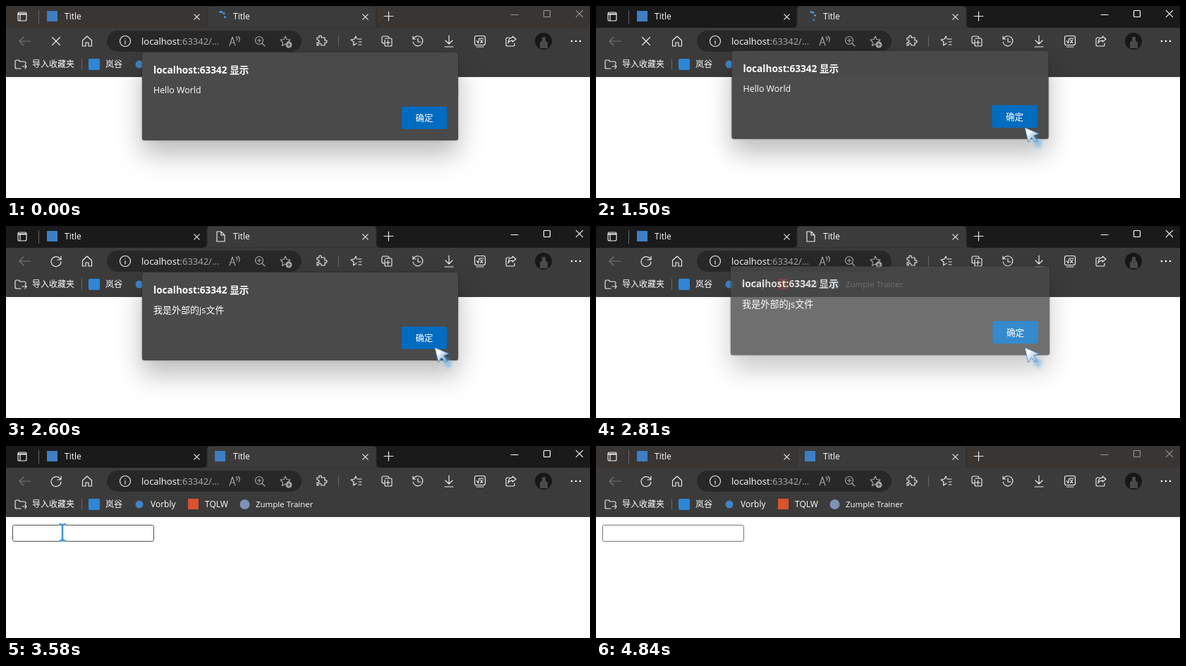
An HTML page that plays this animation: 828x273 px, repeating every 4910 ms.

```html
<!DOCTYPE html>
<html lang="zh">
<head>
<meta charset="utf-8">
<title>Alert dialogs</title>
<style>
  html, body { margin: 0; height: 100%; overflow: hidden; background: #fff; }
  svg { display: block; }
  text { font: 12px 'Open Sans', 'Noto Sans CJK SC', 'Noto Sans CJK', sans-serif; fill: #fff; white-space: pre; }
  .icon { fill: none; stroke-width: 1.15; stroke-linecap: round; stroke-linejoin: round; }
  .panel { fill: #4a4a4a; filter: drop-shadow(0 0 1px #0007) drop-shadow(0 20px 18px #0004); }
  #heading { font-size: 13.6px; font-weight: 700; }
  #ok { font-size: 12.5px; font-weight: 500; text-anchor: middle; }
</style>
</head>
<body>
<svg width="828" height="273" viewBox="0 0 828 273">
  <defs>
    <linearGradient id="ice" x1="0" y1="0" x2="1" y2="1">
      <stop offset=".3" stop-color="#fff"/><stop offset="1" stop-color="#6db0e6" stop-opacity=".7"/>
    </linearGradient>
    <filter id="soft" x="-50%" y="-50%" width="200%" height="200%"><feGaussianBlur stdDeviation="2"/></filter>
  </defs>

  <rect width="828" height="273" fill="#fff"/>
  <rect id="titleBar" width="828" height="31"/>
  <path d="M279 31q6 0 6-6V5q0-5 5-5h230q5 0 5 5v20q0 6 6 6z" fill="#3b3b3b" stroke="#2a2a2a"/>
  <rect y="31" width="828" height="70" fill="#3b3b3b"/>
  <rect x="143" y="35" width="276" height="30" rx="15" fill="#282828"/>
  <path d="M46.5 6v19M471.5 42v16M107.5 75v16" stroke="#666"/>

  <rect x="58" y="7" width="15" height="15" fill="#3d7ec4"/>
  <text x="83" y="19.4">Title</text>
  <text x="322" y="19.4">Title</text>
  <text x="192" y="55" style="font-size:13px">localhost<tspan fill="#aaa">:63342/…</tspan></text>

  <circle cx="762" cy="50" r="12" fill="#171717"/>
  <path d="M757 60v-8l3-3v-5h5v5l3 3v8z" fill="#4c4a48"/>

  <text x="37" y="87">导入收藏夹</text>
  <rect x="117" y="75" width="16" height="16" rx="2" fill="#2f86d6"/>
  <text x="141" y="87">岚谷</text>
  <circle cx="189" cy="83" r="5.5" fill="#3f84c4"/>
  <text x="205" y="87">Vorbly</text>
  <rect x="258" y="75" width="15" height="15" fill="#d9532f"/>
  <text x="282" y="87">TQLW</text>
  <circle cx="338.5" cy="83" r="7" fill="#7d93b8"/>
  <text x="354" y="87" style="font-size:11.5px">Zumple Trainer</text>

  <g id="icons"></g>
  <g id="spinner" fill="#4a9fe0"></g>
  <rect id="favicon" x="296" y="7" width="15" height="15" fill="#3d7ec4"/>

  <g id="field">
    <rect id="box" rx="2" fill="#fff"/>
    <rect id="caret" x="14" y="115" width="1" height="17" fill="#000"/>
  </g>

  <g id="dialog">
    <rect class="panel" x="193" y="66" width="448" height="125" rx="3"/>
    <text id="heading" x="209" y="95.8">localhost:63342 显示</text>
    <text id="message" x="209" y="123.8"></text>
    <rect id="button" x="561" y="143" width="64" height="32" rx="2"/>
    <text id="ok" x="593" y="163.5">确定</text>
  </g>

  <g id="arrow">
    <path d="M10 10L25 20 20 30 13 24z" fill="#5aa9e6" opacity=".5" filter="url(#soft)"/>
    <path d="M0 0L20 8.5 12.5 11.5 18 19 14 20 9.5 14 5 21z" fill="url(#ice)" stroke="#3c86c8" stroke-width=".8" stroke-linejoin="round"/>
  </g>
  <g id="beam" fill="none">
    <path d="M-4.5-12Q0-12 0-8V8Q0 12-4.5 12M4.5-12Q0-12 0-8M0 8Q0 12 4.5 12" stroke="#8cc8f5" stroke-width="3"/>
    <path d="M-4.5-12Q0-12 0-8V8Q0 12-4.5 12M4.5-12Q0-12 0-8M0 8Q0 12 4.5 12" stroke="#2f86d2" stroke-width="1.5"/>
  </g>
</svg>
<script>
const LOOP = 4910;
const $ = id => document.getElementById(id);
const set = (id, attrs) => { for (const k in attrs) $(id).setAttribute(k, attrs[k]); };
const show = (id, on) => set(id, { display: on ? 'inline' : 'none' });

// Line icons: centre, path around that centre, colour, optional id.
const cross = r => `M${-r} ${-r}L${r} ${r}M${r} ${-r}L${-r} ${r}`;
const disc = r => `M${-r} 0a${r} ${r} 0 1 1 ${2 * r} 0a${r} ${r} 0 1 1 ${-2 * r} 0`;
const star = 'M0-7L2-2.5 7-2 3.5 1.5 4.5 6.5 0 4-4.5 6.5-3.5 1.5-7-2-2-2.5z';
const icons = [
  [23, 15, 'M-4-6h8q2 0 2 2v8q0 2-2 2h-8q-2 0-2-2v-8q0-2 2-2M-6-3H6M-6-4H6M-3-3V6'],
  [270.5, 15.5, cross(3.7)], [509.5, 15.5, cross(3.7)],
  [542.5, 14.5, 'M-6.5 0h13M0-6.5v13'],
  [304, 15, 'M-5-7H1L6-2V7H-5zM1-7V-2H6', '#eee', 'page'],
  [721, 12.5, 'M-5 0H5', '', 'minimise'],
  [767, 11, 'M-3.5-4.5h7q1 0 1 1v7q0 1-1 1h-7q-1 0-1-1v-7q0-1 1-1', '', 'maximise'],
  [813, 11, cross(4.7), '', 'close'],
  [27, 50, 'M8 0H-8M-2-6L-8 0-2 6', '#777'],
  [71, 50, cross(5.5), '#eee', 'stop'],
  [71, 50, 'M6.5-2A7 7 0 1 0 7 1M7-7V-2H2', '#eee', 'reload'],
  [115, 50, 'M-6.5-1L0-7 6.5-1V7H2V2H-2V7H-6.5z'],
  [169, 50, disc(7.5) + 'M0-.5V4M0-3.5v.1'],
  [324, 50, 'M-7 6L-3-6 1 6M-5.5 2H-.5M2-6q3 2 1 5M5-7q4 4 1 8', '#aaa'],
  [359, 49, disc(5.5) + 'M4 4L8 8M-2.5 0h5M0-2.5v5', '#aaa'],
  [396, 50, star, '#aaa'],
  [447, 50, 'M-6-5h3q-1-3 1.5-3t1.5 3H5V-1q3-1 3 1.5T5 2V6H0Q0 3-2 3T-4 6H-6V2q3 0 3-2T-6-2z'],
  [496, 50, 'M2-3H8M4 1H8M4 5H8M1 3L-3.5 6-3 1-7-2-2-3 0-7 1-4'],
  [540, 50, 'M-4 3q-3 0-3-2v-6q0-2 2-2h6q2 0 2 2M-2-4h7q2 0 2 2v7q0 2-2 2h-6q-2 0-2-2v-7M1.5-1v6M-1.5 2h6'],
  [584, 50, 'M-6-4A7 7 0 1 1-7 1M-7-7V-3H-3M0-4V1H4'],
  [628, 50, 'M0-8V4M-5-1L0 4 5-1M-6 8H6'],
  [672, 50, 'M-5-7.5H5q2.5 0 2.5 2.5V3q0 2.5-2.5 2.5H-5q-2.5 0-2.5-2.5V-5q0-2.5 2.5-2.5M-5 0h1l1.5 3L-1-4H5M.5-2L4 2.5M4-2L.5 2.5M-5 8H5'],
  [716, 50, 'M-2-5H-5q-2 0-2 2V5q0 2 2 2H3q2 0 2-2V3M2-7L7-3 2 1V-1Q-3-1-4 3-4-5 2-5z'],
  [21, 83, 'M0 6H-6q-2 0-2-2v-8q0-2 2-2h3l2 2h6q2 0 2 2v1M2 3H8M6 0L8 3 6 6'],
];
$('icons').innerHTML = icons.map(([x, y, d, colour = '#eee', id = '']) =>
  `<path ${id && `id="${id}"`} class="icon" transform="translate(${x} ${y})" d="${d}" stroke="${colour}"/>`).join('')
  + [802, 808, 814].map(x => `<circle cx="${x}" cy="50" r="1.3" fill="#fff"/>`).join('')
  + '<circle cx="401" cy="55" r="4.5" fill="#aaa"/><path d="M398.5 55h5M401 52.5v5" stroke="#282828"/>';

$('spinner').innerHTML = '<circle r="1.5"/>'.repeat(5);
const dots = [...$('spinner').children];

function drawSpinner(t) {
  dots.forEach((dot, i) => {
    const p = t / 1400 - .03 - i * .12;
    const angle = Math.PI / 2 + 2 * Math.PI * (p + .1 * Math.sin(2 * Math.PI * p));
    dot.setAttribute('cx', 304 + 6.7 * Math.cos(angle));
    dot.setAttribute('cy', 15 + 6.7 * Math.sin(angle));
    dot.setAttribute('opacity', Math.max(0, Math.min(1, (.95 - Math.sin(angle)) * 3)));
  });
}

// Pointer stops: time, x, y
const stops = [[70, 580, 197], [480, 608, 173], [2900, 608, 173], [3440, 150, 139],
  [3580, 80, 123], [3850, 80, 123], [4130, 364, 199]];

function pointerAt(t) {
  const i = stops.findIndex(s => s[0] > t);
  if (i < 1) return stops[i ? stops.length - 1 : 0].slice(1);
  const [t0, x0, y0] = stops[i - 1], [t1, x1, y1] = stops[i];
  const u = (t - t0) / (t1 - t0), e = u * u * (3 - 2 * u);
  return [x0 + (x1 - x0) * e, y0 + (y1 - y0) * e];
}

function drawDialog(t) {
  const first = t < 1640;
  const leaving = Math.max(0, t - (first ? 1435 : 2680)) / 130;
  const rise = leaving ** 2;
  const enter = first ? 1 : Math.min(1, (t - 1620) / 80);
  const hover = first ? t > 500 && t < 1400 : t < 2450;
  show('dialog', t < 2945);
  $('message').textContent = first ? 'Hello World' : '我是外部的js文件';
  $('message').style.fontSize = first ? '12.4px' : '13px';
  set('button', { fill: hover ? '#1c7bc6' : '#006cc0' });
  set('dialog', {
    opacity: Math.max(0, enter * (1 - .2 * leaving ** 4)),
    transform: `translate(417 ${128.5 - 8 * rise}) scale(${1 + .009 * rise}) translate(-417 -128.5)`,
  });
}

function draw(t) {
  const active = t >= 1160 && t < 4840;
  set('titleBar', { fill: active ? '#1a1a1a' : '#383533' });
  for (const id of ['minimise', 'maximise', 'close']) set(id, { stroke: active ? '#fff' : '#999' });

  const loading = t < 2600;
  show('spinner', loading);
  show('stop', loading);
  show('reload', !loading);
  show('page', !loading && t < 3230);
  show('favicon', t >= 3230);
  drawSpinner(Math.min(t, 1990));
  drawDialog(t);

  const [x, y] = pointerAt(t);
  const visible = t >= 70 && t < 4170;
  const over = visible && x > 9 && x < 210 && y > 112 && y < 136;
  const focus = t >= 3850 && t < 4840;
  show('arrow', visible && !over);
  show('beam', over);
  set('arrow', { transform: `translate(${x} ${y})` });
  set('beam', { transform: `translate(${x} ${y})` });

  show('field', t >= 2945);
  show('caret', focus && t < 4380);
  const w = focus ? 2 : 1;
  set('box', {
    x: 9 + w / 2, y: 112 + w / 2, width: 201 - w, height: 24 - w,
    'stroke-width': w, stroke: focus ? '#101010' : over ? '#4f4f4f' : '#767676',
  });
}

function tick() {
  draw(performance.now() % LOOP);
  requestAnimationFrame(tick);
}
tick();
</script>
</body>
</html>
```
